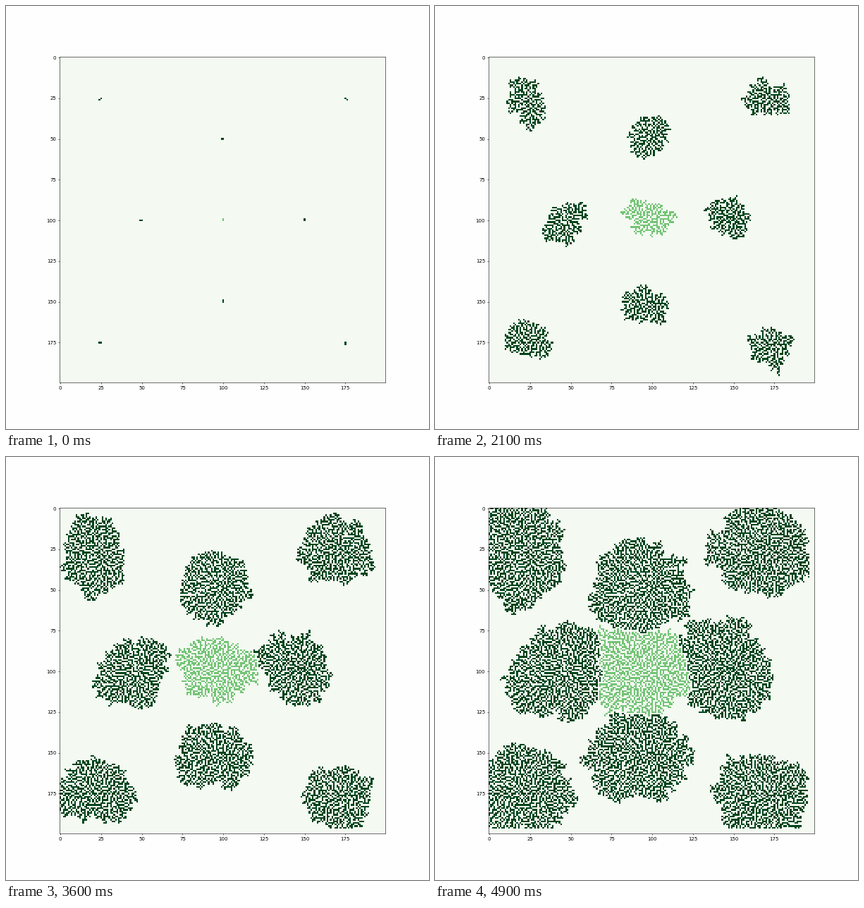
Animation of 600 by 600 pixels, one loop 5000 ms. Source, as a matplotlib script:

```python
import random

import numpy as np
import matplotlib.pyplot as plt
from matplotlib.animation import FuncAnimation
from matplotlib.colors import ListedColormap

SIZE, LIMIT, FRAMES = 200, 197, 50
GROWTH = 1.12    # extra cells per colony, added to each frame's quota
LEFT_BIAS = 0.2  # colonies spread a little faster to the left
COLOURS = ["#f4f9f2", "#74c476", "#00441b"]

CENTRE = (100, 100)
CORNERS = [(x, y) for y in (25, 175) for x in (25, 175)]
RING = [(100, 50), (50, 100), (150, 100), (100, 150)]
SEEDS = [CENTRE] + CORNERS + RING

STEPS = [(dx, dy) for dx in (-1, 0, 1) for dy in (-1, 0, 1) if dx or dy]


def neighbours(cell):
    x, y = cell
    return [(x + dx, y + dy) for dx, dy in STEPS]


def fits(owner, cell, colony):
    """A free cell may be taken if it keeps walls thin and colonies apart."""
    if cell in owner:
        return False
    near = [owner[n] for n in neighbours(cell) if n in owner]
    return len(near) <= 2 and all(n == colony for n in near)


def openings(owner, cell, colony):
    return [n for n in neighbours(cell) if fits(owner, n, colony)]


def grow(owner, tips, colony, quota):
    """Let random tips sprout; return the tips that can still grow."""
    tips = [tip for tip in tips if openings(owner, tip, colony)]
    quota = min(quota, max(2, len(tips) // 2))
    while quota and tips:
        i = random.randrange(len(tips))
        options = openings(owner, tips[i], colony)
        if not options:
            tips[i] = tips[-1]
            tips.pop()
            continue
        cell = random.choice(options)
        dx = cell[0] - tips[i][0]
        if random.random() < 1 - LEFT_BIAS * (1 + dx):
            owner[cell] = colony
            tips.append(cell)
            quota -= 1
    return tips


def draw_grid(owner):
    grid = np.zeros((SIZE, SIZE))
    for (x, y), colony in owner.items():
        if 0 <= x < LIMIT and 0 <= y < LIMIT:
            grid[y, x] = 1 if SEEDS[colony] == CENTRE else 2
    return grid


def simulate():
    random.seed(8)
    owner = {seed: n for n, seed in enumerate(SEEDS)}
    tips = [[seed] for seed in SEEDS]
    grids = []
    for frame in range(FRAMES):
        quota = round(GROWTH * (frame + 1))
        for n in range(len(SEEDS)):
            tips[n] = grow(owner, tips[n], n, quota)
        grids.append(draw_grid(owner))
    return grids


grids = simulate()
fig = plt.figure(figsize=(12, 12), dpi=50, facecolor="#fefefe")
ax = fig.add_axes([76 / 600, 66 / 600, 462 / 600, 462 / 600])
image = ax.imshow(grids[0], cmap=ListedColormap(COLOURS), vmin=0, vmax=2,
                  interpolation="nearest")


def update(frame):
    image.set_data(grids[frame])
    return [image]


anim = FuncAnimation(fig, update, frames=FRAMES, interval=100,
                     repeat=True, repeat_delay=0)
plt.show()
```
